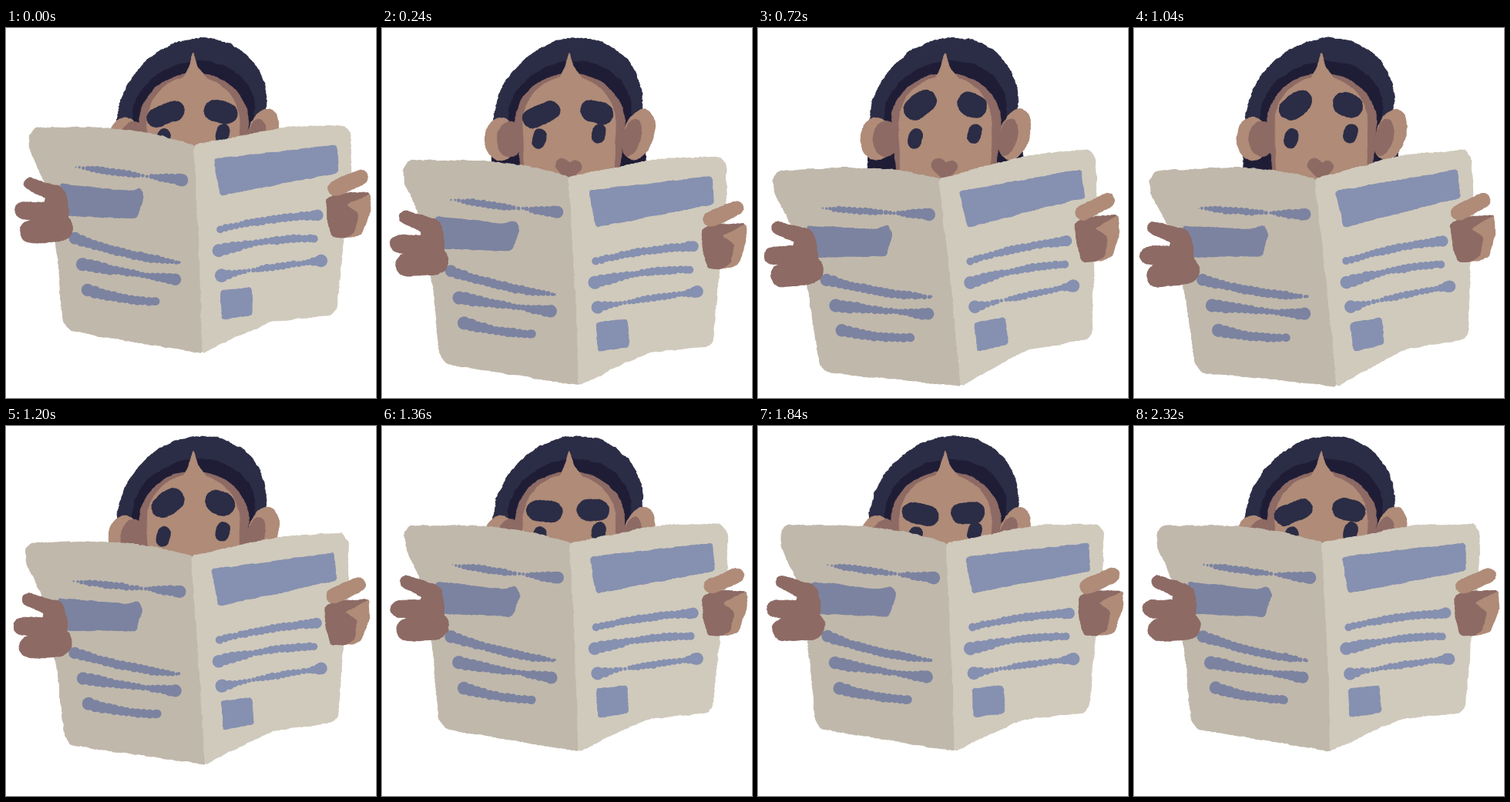
Animation, 480 px wide and 480 px high, one loop 2.4 s. Source, as an HTML page:

```html
<!DOCTYPE html>
<html lang="en">
<head>
<meta charset="utf-8">
<title>Newspaper reader</title>
<style>
  html, body { margin: 0; width: 100%; height: 100%; overflow: hidden; background: #fff; }
  svg { display: block; width: 100vw; height: 100vh; }
</style>
</head>
<body>
<svg id="stage" viewBox="0 0 480 480" xmlns="http://www.w3.org/2000/svg"></svg>
<script>
const stage = document.getElementById('stage');
const LOOP = 2400, STEP = 80;
const HELD = [800, 960, 1600]; // steps that repeat the drawing before them

const HAIR = '#2b2c45', DARK = '#1f1d36', SKIN = '#af8b78', SHADE = '#8d6a64';
const PAGE_L = '#c0b8ab', PAGE_R = '#d0cabc', INK_L = '#7c83a0', INK_R = '#8690b0';

const mix = (a, b, p) => a + (b - a) * p;
const mixAll = (a, b, p) => a.map((v, i) => mix(v, b[i], p));
const ease = p => p * p * (3 - 2 * p);
const ramp = (t, a, b) => ease(Math.min(1, Math.max(0, (t - a) / (b - a))));
const fix = v => v.toFixed(1);

let seed = 1;
function rand() {
  seed = (seed + 0x6d2b79f5) | 0;
  let n = Math.imul(seed ^ (seed >>> 15), 1 | seed);
  n = (n + Math.imul(n ^ (n >>> 7), 61 | n)) ^ n;
  return ((n ^ (n >>> 14)) >>> 0) / 4294967296;
}
const wobble = amount => (rand() * 2 - 1) * amount;

// Outlines, each a list of points

const poly = text => text.split(' ').map(p => p.split(',').map(Number));

function arc(cx, cy, rx, ry, from, to, n = 12) {
  return Array.from({ length: n + 1 }, (_, i) => {
    const a = mix(from, to, i / n);
    return [cx + rx * Math.cos(a), cy + ry * Math.sin(a)];
  });
}

function oval(cx, cy, rx, ry, lean = 0) {
  return arc(cx, cy, rx, ry, 0, 2 * Math.PI, 20).slice(1)
    .map(([x, y]) => [x + (cy - y) * lean, y]);
}

// Half ellipse on straight sides; lean shifts the crown sideways
function dome(cx, cy, rx, ry, lean, bottom, flare) {
  const top = arc(cx, cy, rx, ry, Math.PI, 2 * Math.PI, 16)
    .map(([x, y]) => [x + lean * (cy - y) / ry, y]);
  return [...top, [cx + rx + flare, bottom], [cx - rx - flare, bottom]];
}

function capsule(x0, y0, x1, y1, r0, r1 = r0) {
  const a = Math.atan2(y1 - y0, x1 - x0), h = Math.PI / 2;
  return [...arc(x1, y1, r1, r1, a - h, a + h, 6), ...arc(x0, y0, r0, r0, a + h, a + 3 * h, 6)];
}

// Brush drawing

function split(list, gap) {
  return list.flatMap((a, i) => {
    const b = list[(i + 1) % list.length];
    const n = Math.ceil(Math.hypot(b[0] - a[0], b[1] - a[1]) / gap);
    return Array.from({ length: n }, (_, k) => mixAll(a, b, k / n));
  });
}

function soften(list) {
  return list.flatMap((a, i) => {
    const b = list[(i + 1) % list.length];
    return [mixAll(a, b, 0.25), mixAll(a, b, 0.75)];
  });
}

function blob(outline, color, rough = 0.8) {
  const loose = split(outline, 9).map(([x, y]) => [x + wobble(rough), y + wobble(rough)]);
  const edge = split(soften(soften(loose)), 3.5)
    .map(([x, y]) => fix(x + wobble(rough / 2)) + ',' + fix(y + wobble(rough / 2)));
  return `<path d="M${edge.join('L')}Z" fill="${color}" stroke="${color}" stroke-width="1"/>`;
}

// A bent row of dabs; the key sizes are spread evenly along it
function row(color, x0, y0, x1, y1, bend, sizes) {
  const length = Math.hypot(x1 - x0, y1 - y0), last = sizes.length - 1;
  let out = '';
  for (let p = 0, done = false; !done;) {
    done = p >= 1;
    p = Math.min(p, 1);
    const i = Math.min(Math.floor(p * last), last - 1);
    const r = mix(sizes[i], sizes[i + 1], p * last - i);
    const x = mix(x0, x1, p) + wobble(0.5);
    const y = mix(y0, y1, p) + bend * 4 * p * (1 - p) + wobble(0.5);
    out += `<circle cx="${fix(x)}" cy="${fix(y)}" r="${fix(r + wobble(0.3))}" fill="${color}"/>`;
    p += (4 + 0.6 * r) / length;
  }
  return out;
}

// Eyebrows as capsules: calm, worried, stern
const browL = [[195, 117, 219, 107, 12.5], [203, 105, 217, 95, 14.5], [200, 112, 222, 117, 13]];
const browR = [[271, 107, 286, 111, 14], [273, 98, 282, 102, 15], [264, 113, 281, 112, 13.5]];

function brow([calm, worried, stern], t) {
  const up = mixAll(calm, worried, ramp(t, 240, 520));
  const down = mixAll(up, stern, ramp(t, 1200, 1440));
  return blob(capsule(...mixAll(down, calm, ramp(t, 2000, 2240))), HAIR);
}

function head(t) {
  return blob(dome(241, 112, 96, 99, 14, 200, 4), HAIR, 1.2) +
    blob(poly('144,152 342,152 344,200 142,200'), DARK, 1.2) +
    blob(dome(243, 110, 79, 67, 8, 200, 0), DARK, 1.2) +
    blob(oval(154, 144, 21, 28), SKIN) + blob(oval(333, 138, 20, 33, 0.2), SKIN) +
    blob(dome(244, 122, 71, 63, 0, 187, -7), SHADE) +
    blob(oval(166, 144, 17, 23), SHADE) + blob(oval(324, 142, 12, 24, 0.2), SHADE) +
    blob(dome(243, 122, 60, 59, 0, 204, -2), SKIN, 0.6) +
    blob(poly('243,31 248,50 262,68 228,69 237,52'), SKIN, 0.5) +
    blob(capsule(234, 178, 243, 187, 9), SHADE, 0.5) + blob(capsule(251, 180, 243, 187, 8), SHADE, 0.5) +
    blob(capsule(205, 139, 203, 148, 8.5), HAIR, 0.5) + blob(capsule(282, 133, 280, 141, 8.5), HAIR, 0.5) +
    brow(browL, t) + brow(browR, t);
}

const leftPage = () =>
  blob(poly('29,140 37,129 135,130 190,137 245,152 253,260 255,422 180,409 83,393 74,380 66,290 50,200 31,158'), PAGE_L, 1) +
  blob(poly('70,202 158,212 174,208 179,219 169,247 76,243'), INK_L) +
  row(INK_L, 91, 180, 228, 197, 1, [1, 4.5, 5, 4.5, 2, 6, 8]) +
  row(INK_L, 90, 273, 224, 304, 4, [8, 6, 6, 6, 5.5, 2]) +
  row(INK_L, 100, 307, 219, 326, 1, [8.5, 8, 6, 5, 3.5, 6, 8]) +
  row(INK_L, 106, 340, 194, 355, 3, [8.5, 7, 6, 6, 5.5]);

const rightPage = () =>
  blob(poly('244,152 360,129 440,127 448,138 447,200 438,270 429,365 422,372 345,380 300,400 255,422 252,320'), PAGE_R, 1) +
  blob(poly('270,170 429,152 431,188 340,205 278,217'), INK_R) +
  blob(poly('278,341 318,337 320,372 280,378'), INK_R) +
  row(INK_R, 278, 261, 404, 243, -3, [5, 4.5, 5.5, 5.5, 5.5, 7]) +
  row(INK_R, 276, 289, 400, 273, -4, [8.5, 7, 4, 5.5, 5.5, 5]) +
  row(INK_R, 280, 321, 409, 302, -1, [8.5, 4, 2.5, 4.5, 5, 4.5, 3.5, 8]);

const leftHand = () =>
  blob(capsule(31, 202, 67, 217, 8, 11), SHADE) +
  blob(capsule(22, 237, 60, 240, 11, 14), SHADE) +
  blob(capsule(33, 264, 69, 259, 15, 18), SHADE) +
  blob(oval(65, 238, 16, 34), SHADE);

const rightHand = () =>
  blob(poly('417,222 473,214 473,237 462,267 450,271 424,271 417,245'), SKIN) +
  blob(poly('416,222 430,214 472,214 456,222 441,229 457,241 452,265 440,272 423,271 417,250'), SHADE) +
  blob(capsule(427, 208, 460, 194, 9.5), SKIN);

function paper(t) {
  const lower = ramp(t, 0, 240), tilt = ramp(t, 240, 520), back = 1 - ramp(t, 1040, 1320);
  const dx = mix(-0.5 * lower, -3, tilt) * back;
  const dy = mix(41.5 * lower, 43.2, tilt) * back;
  const angle = mix(-0.4 * lower, -3.7, tilt) * back;
  return `<g transform="translate(${dx.toFixed(2)} ${dy.toFixed(2)}) rotate(${angle.toFixed(3)} 250 250)">` +
    leftPage() + rightPage() + leftHand() + rightHand() + '</g>';
}

let shown = -1;
function draw(now) {
  let t = Math.floor((now % LOOP) / STEP) * STEP;
  if (HELD.includes(t)) t -= STEP;
  if (t === shown) return;
  shown = t;
  seed = t * 7919 + 17;
  stage.innerHTML = head(t) + paper(t);
}

let start = null;
function tick(now) {
  if (start === null) start = now;
  draw(now - start);
  requestAnimationFrame(tick);
}
draw(0);
requestAnimationFrame(tick);
</script>
</body>
</html>
```
